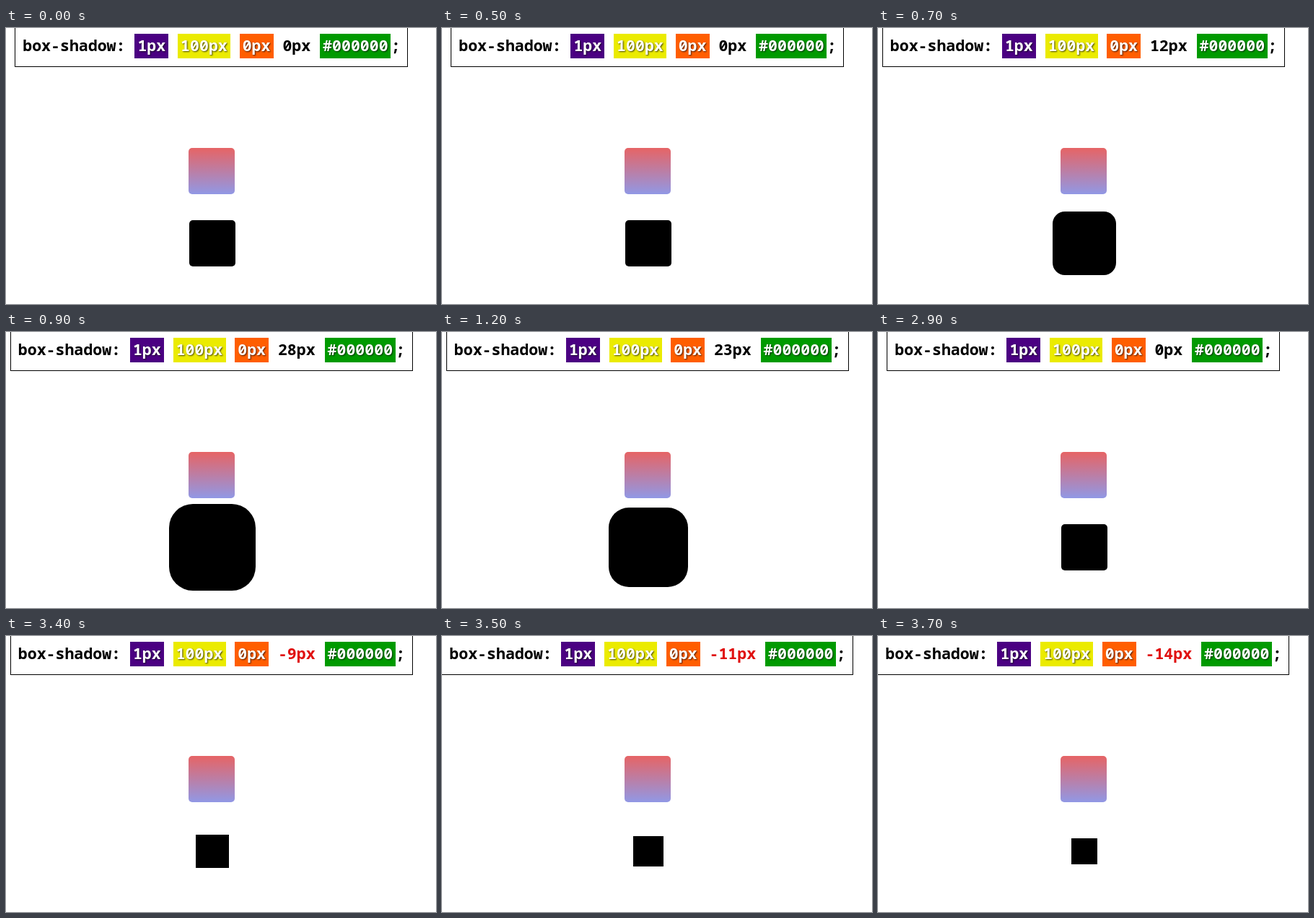
Recreate the animation shown at these times as an HTML page with a canvas. Size 596 by 382 pixels, loop 4.3 s.

```html
<!DOCTYPE html>
<html lang="en">
<head>
<meta charset="utf-8">
<title>box-shadow spread</title>
<style>
  html, body { margin: 0; width: 100%; height: 100%; overflow: hidden; background: #fff; }
  canvas { display: block; }
</style>
</head>
<body>
<canvas id="stage" width="596" height="382"></canvas>
<script>
const ctx = document.getElementById('stage').getContext('2d');
const LOOP = 4300;
const CENTER_X = 284.9;
const SIZE = 64, RADIUS = 5;
const TAG_PADDING = 4, FRAME_PADDING = 11;

// [start in ms, spread in px]
const steps = [
  [0, 0], [700, 12], [800, 23], [900, 28], [1200, 23],
  [2700, 13], [2800, 4], [2900, 0],
  [3400, -9], [3500, -11], [3600, -13], [3700, -14]
];

const spreadAt = time => steps.findLast(([start]) => start <= time)[1];

function roundedSquare(x, y, size, radius, fill) {
  ctx.fillStyle = fill;
  ctx.beginPath();
  ctx.roundRect(x, y, size, size, radius);
  ctx.fill();
}

function drawDeclaration(spread) {
  const parts = [
    ['box-shadow: '], ['1px', '#4b0082'], [' '], ['100px', '#ebeb00'], [' '],
    ['0px', '#ff5e00'], [' '], [spread + 'px', null, spread < 0 ? '#e01010' : '#000'],
    [' '], ['#000000', '#009a00'], [';']
  ];
  ctx.font = 'bold 21.55px "Noto Sans Mono", "DejaVu Sans Mono", monospace';
  const widthOf = ([text, tag]) => ctx.measureText(text).width + (tag ? 2 * TAG_PADDING : 0);
  const width = parts.reduce((sum, part) => sum + widthOf(part), 2 * FRAME_PADDING);
  const left = CENTER_X - width / 2;

  ctx.strokeStyle = '#000';
  ctx.lineWidth = 1;
  ctx.strokeRect(Math.round(left) + 0.5, -10.5, Math.round(width) - 1, 64);

  let x = left + FRAME_PADDING;
  for (const part of parts) {
    const [text, tag, color = '#000'] = part;
    const partWidth = widthOf(part);
    ctx.save();
    if (tag) {
      ctx.fillStyle = tag;
      ctx.fillRect(Math.round(x), 8, Math.round(partWidth), 34);
      ctx.shadowColor = 'rgba(0, 0, 0, 0.7)';
      ctx.shadowOffsetX = ctx.shadowOffsetY = 1;
      ctx.shadowBlur = 2;
    }
    ctx.fillStyle = tag ? '#fff' : color;
    ctx.fillText(text, x + (tag ? TAG_PADDING : 0), 32);
    ctx.restore();
    x += partWidth;
  }
}

function drawSquares(spread) {
  const gradient = ctx.createLinearGradient(0, 166, 0, 166 + SIZE);
  gradient.addColorStop(0, '#e66465');
  gradient.addColorStop(1, '#9198e5');
  roundedSquare(254 - spread, 266 - spread, SIZE + 2 * spread, Math.max(0, RADIUS + spread), '#000');
  roundedSquare(253, 166, SIZE, RADIUS, gradient);
}

function render(now) {
  const spread = spreadAt(now % LOOP);
  ctx.fillStyle = '#fff';
  ctx.fillRect(0, 0, 596, 382);
  drawDeclaration(spread);
  drawSquares(spread);
}

const origin = performance.now();
function tick() {
  render(performance.now() - origin);
  requestAnimationFrame(tick);
}
tick();
</script>
</body>
</html>
```
